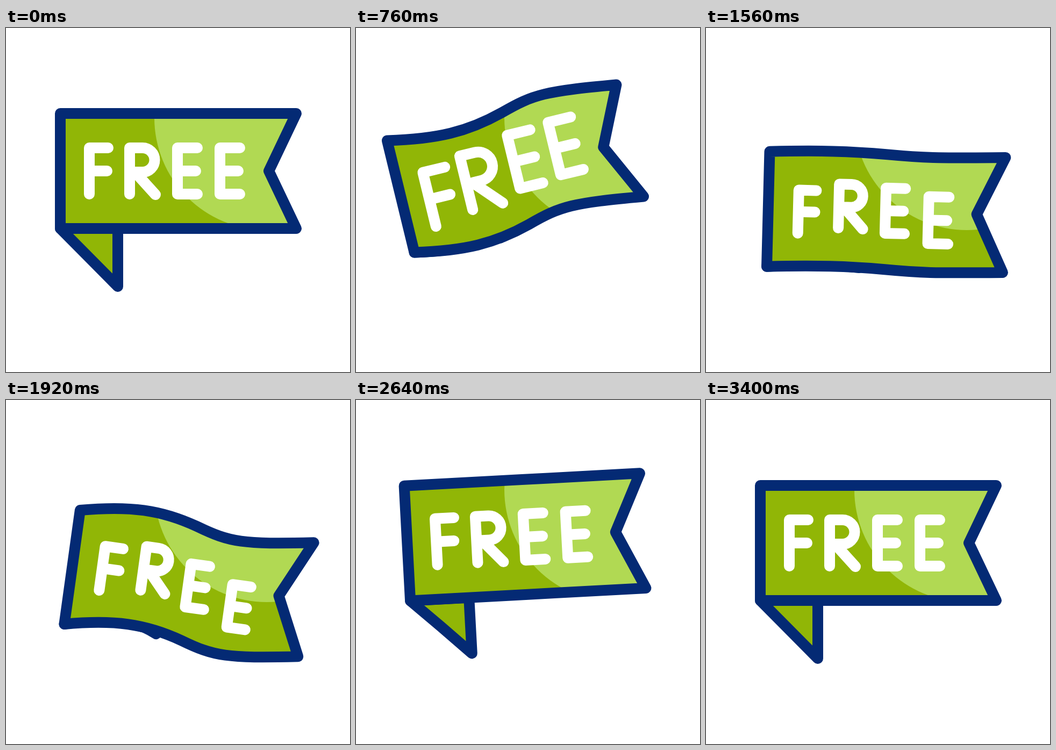
Recreate the animation shown at these times as an HTML page with a canvas. Size 640 by 640 pixels, loop 3600 ms.

```html
<!DOCTYPE html>
<html lang="en">
<head>
<meta charset="utf-8">
<title>Free ribbon</title>
<style>
html, body { margin: 0; width: 100%; height: 100%; overflow: hidden; background: #fff; }
canvas { display: block; width: 640px; height: 640px; }
</style>
</head>
<body>
<canvas id="stage" role="img" aria-label="FREE"></canvas>
<script>
const LOOP = 3600, W = 439, H = 214, LINE = 20;
const NAVY = '#042a74', GREEN = '#91b606', LIGHT = '#b1d953', WHITE = '#fff';

const canvas = document.getElementById('stage');
const ctx = canvas.getContext('2d');
const ratio = window.devicePixelRatio || 1;
canvas.width = canvas.height = 640 * ratio;

// Smooth swing from 0 through [time, value] points, flat at every extreme.
function swing(...points) {
  const keys = [[0, 0], ...points], last = keys.length - 1;
  const rate = i => (keys[i + 1][1] - keys[i][1]) / (keys[i + 1][0] - keys[i][0]);
  const slope = keys.map((_, i) => {
    if (i === 0 || i === last) return 0;
    const a = rate(i - 1), b = rate(i);
    return a * b <= 0 ? 0 : 2 * a * b / (a + b);
  });
  return t => {
    if (t >= keys[last][0]) return keys[last][1];
    let i = 0;
    while (t >= keys[i + 1][0]) i++;
    const [t0, v0] = keys[i], [t1, v1] = keys[i + 1];
    const d = t1 - t0, u = (t - t0) / d, w = 1 - u;
    return w * w * ((1 + 2 * u) * v0 + u * d * slope[i]) +
           u * u * ((1 + 2 * w) * v1 - w * d * slope[i + 1]);
  };
}

const tilt = swing([1000, -16], [1860, 8.2], [2520, -4], [3000, 1.9], [3400, 0]);
const drop = swing([1380, 77], [1920, 44], [2700, 0]);
const wave = swing([1050, 18], [1920, -16], [2620, 0]);
const fold = swing([900, 1], [1850, 1.1], [2740, 0]);

// Letter outlines sit around the middle of the stem.
const F = 'M35 -43H0V43M0 0H33';
const R = 'M0 43V-43H24A22.5 22.5 0 0 1 24 2H10L48 44';
const E = 'M37 -43H0V43H37M0 0H34';

// Each letter sways down the ribbon by a, then b, and pulses a little later than the one before.
const letters = [
  { d: F, x: 54, pivot: 26, a: 21, b: -5.5 },
  { d: R, x: 129, pivot: 26, a: 5, b: -16 },
  { d: E, x: 218, pivot: 0, a: -15, b: 4 },
  { d: E, x: 297, pivot: 0, a: -22, b: 31 }
].map(({ d, x, pivot, a, b }, i) => {
  const peak = 760 + 90 * i;
  return {
    x, pivot,
    path: new Path2D(d),
    shift: swing([1000, a], [1920, b], [2640, 0]),
    grow: swing([peak, 0.2], [peak + 850, -0.07], [2300, 0])
  };
});

// The S-shaped edge as two Béziers, between x offsets from the left corner.
const HALF = W / 2;
const HANDLES = [0, 0.42, 0.68, 1, 1.3, 1.4, 2].map(v => v * HALF);

function edge(path, y, amp, reverse) {
  const k = amp * 4 / 3;
  let pts = HANDLES.map((x, i) => [x, y + [0, k, k, 0, -k, -k, 0][i]]);
  if (reverse) pts = pts.reverse();
  path.lineTo(...pts[0]);
  path.bezierCurveTo(...pts[1], ...pts[2], ...pts[3]);
  path.bezierCurveTo(...pts[4], ...pts[5], ...pts[6]);
}

function flagPath(amp) {
  const p = new Path2D();
  edge(p, -H, amp, false);
  p.lineTo(388, -H / 2);
  edge(p, 0, amp, true);
  p.closePath();
  return p;
}

// The way back follows the ribbon's lower edge, so it stays hidden.
function tailPath(f, amp) {
  const x = 107 + 60 * f, y = 108 - 105 * f;
  const hem = v => amp * Math.sin(2 * Math.PI * v / W);
  const p = new Path2D();
  p.moveTo(0, 0);
  p.quadraticCurveTo(x / 2, y / 2 - 38 * f, x, y);
  p.lineTo(x, hem(x));
  p.quadraticCurveTo(x / 2, 2 * hem(x / 2) - hem(x) / 2 - 4 * f, 0, 0);
  p.closePath();
  return p;
}

function outline(path, color) {
  ctx.strokeStyle = color;
  ctx.stroke(path);
}

function draw(t) {
  const amp = wave(t), fall = drop(t);
  const place = new DOMMatrix()
    .translate(101 + 0.17 * fall, 373 + fall)
    .rotate(tilt(t));
  const onStage = (path, m = place) => {
    const p = new Path2D();
    p.addPath(path, m);
    return p;
  };

  ctx.setTransform(ratio, 0, 0, ratio, 0, 0);
  ctx.fillStyle = WHITE;
  ctx.fillRect(0, 0, 640, 640);
  ctx.lineWidth = LINE;
  ctx.lineCap = ctx.lineJoin = 'round';

  const tail = onStage(tailPath(fold(t), amp));
  const flag = onStage(flagPath(amp));
  ctx.fillStyle = GREEN;
  ctx.fill(tail);
  outline(tail, NAVY);
  ctx.fill(flag);

  // The highlight stays still while the ribbon moves through it.
  ctx.save();
  ctx.clip(flag);
  ctx.fillStyle = LIGHT;
  ctx.beginPath();
  ctx.arc(485, 167, 209, 0, 2 * Math.PI);
  ctx.fill();
  ctx.restore();
  outline(flag, NAVY);

  for (const l of letters) {
    const g = l.grow(t), dy = l.shift(t);
    const m = place
      .translate(l.x - g * l.pivot + 0.1 * Math.abs(dy), dy - H / 2)
      .scale(1 + g);
    outline(onStage(l.path, m), WHITE);
  }
}

const start = performance.now();
function tick() {
  draw((performance.now() - start) % LOOP);
  requestAnimationFrame(tick);
}
tick();
</script>
</body>
</html>
```
